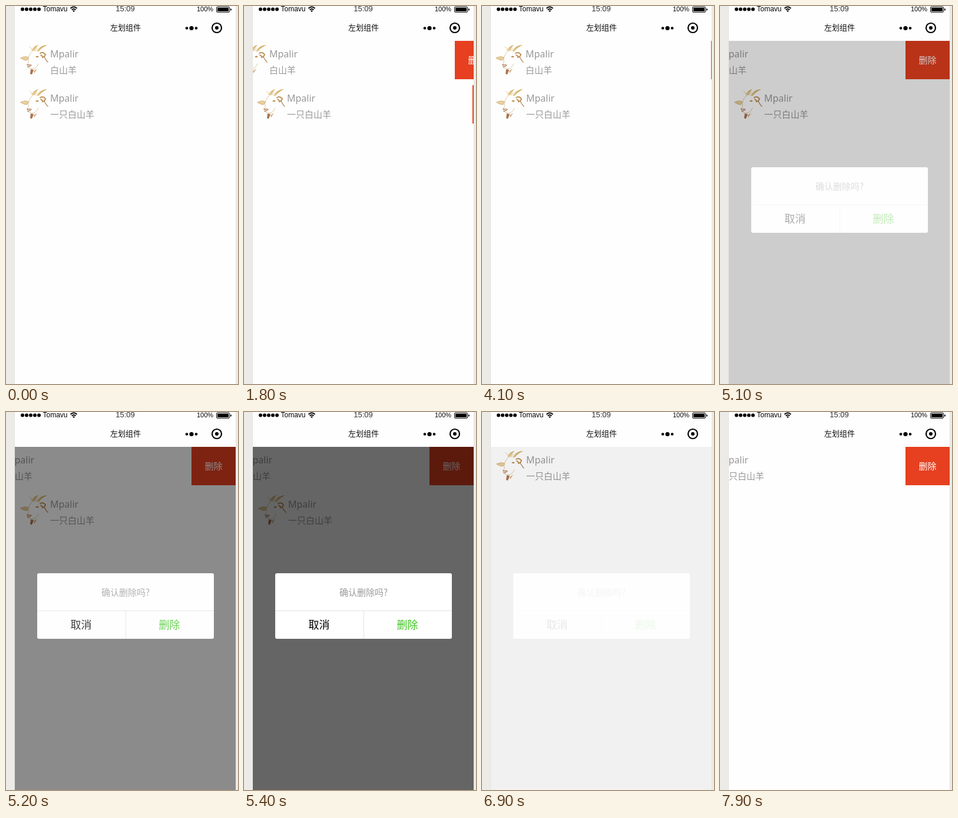
An HTML page for the animation above (8 s loop, 394 px wide and 640 px high).

```html
<!DOCTYPE html>
<html lang="zh-CN">
<head>
<meta charset="utf-8">
<style>
html, body { margin: 0; width: 100%; height: 100%; overflow: hidden; background: #ecebe7; }
svg { display: block; }
text { font-family: "Noto Sans CJK SC", "Noto Sans CJK", "Noto Sans", sans-serif; }
.bar text { font-family: "Liberation Sans", Arial, sans-serif; }
.name { font: 16px "Noto Sans", "Open Sans", sans-serif; fill: #999; }
.note { font-size: 15px; fill: #999; }
.mid { text-anchor: middle; }
</style>
</head>
<body>
<svg width="394" height="640" viewBox="0 0 394 640">
  <defs>
    <clipPath id="page"><rect x="15" y="59" width="375" height="581"/></clipPath>
    <linearGradient id="horn" x1="0" y1="1" x2="1" y2="0">
      <stop stop-color="#ecd5a4"/><stop offset="1" stop-color="#cda24f"/>
    </linearGradient>
    <g id="goat" fill="none" stroke="#cfa869" stroke-linecap="round">
      <path d="M13 22Q16 13 20 11M13 25Q14 30 11 33Q10 37 14 39Q18 41 23 40Q28 37 30 32" stroke="#dfc79c"/>
      <path d="M18 10C20 5 24 1 30 0C26 4 25 7 24 10ZM27 11C30 5 36 0 45 0C38 3 34 7 31 11Z" fill="url(#horn)" stroke="none"/>
      <path d="M20 10Q19 5 15 3M25 10L28 5" stroke="#e4cf9f"/>
      <path d="M0 22Q7 18 13 21Q14 25 9 26Q3 25 0 22Z" fill="#e8cf9f" stroke-width=".8"/>
      <path d="M33 14Q38 11 42 16Q41 20 37 21Q37 18 34 17" stroke="#b98a4a" stroke-width="1.800"/>
      <path d="M40 20Q42 25 46 29" stroke="#b88b62" stroke-width="1.300"/>
      <path d="M25 20Q28 17 31 20Q28 22 25 20Z" fill="#b98743" stroke="none"/>
      <path d="M11 33Q13 35 16 33M12 37Q15 37 18 34" stroke="#a9734f" stroke-width="1.300"/>
      <path d="M17 41L16 49L19 50L22 42Z" fill="#a9734f" stroke="none"/>
      <path d="M22 44L23 48L28 40Z" fill="#d3b08c" stroke="none"/>
    </g>
  </defs>

  <rect width="394" height="640" fill="#ecebe7"/>
  <rect x="14" width="377" height="640" fill="#e4e3de"/>
  <rect x="15" width="375" height="640" fill="#fefefe"/>

  <g class="bar">
    <g id="signal"></g>
    <text x="62.500" y="9" font-size="12">Tomavu</text>
    <g fill="none" stroke="#000" stroke-width="2">
      <path d="M109.500 4Q115 -1 120.500 4M111.700 6.500Q115 3.500 118.300 6.500"/>
    </g>
    <path d="M113 8Q115 6.500 117 8L115 10.200Z"/>
    <text class="mid" x="202.500" y="9" font-size="13" fill="#333">15:09</text>
    <text x="324" y="9" font-size="11">100%</text>
    <rect x="357.500" y="1.500" width="22" height="9" rx="1.500" fill="none" stroke="#000"/>
    <rect x="359" y="3" width="19" height="6"/>
    <path d="M381 4Q383 4.500 383 6T381 8Z"/>
  </g>
  <text class="mid" x="203" y="40.500" font-size="13" fill="#111">左划组件</text>
  <circle cx="307" cy="37.500" r="2.300"/>
  <circle cx="315" cy="37.500" r="3.600"/>
  <circle cx="323" cy="37.500" r="2.300"/>
  <circle cx="358" cy="37" r="8" fill="none" stroke="#000" stroke-width="2.200"/>
  <circle cx="358" cy="37" r="3"/>

  <g clip-path="url(#page)">
    <g id="list"></g>
    <g id="modal">
      <rect x="15" y="59" width="375" height="581" fill="#000" opacity=".6"/>
      <rect x="53" y="273" width="300" height="111" rx="3" fill="#fff"/>
      <path id="press" d="M203 336H353V381Q353 384 350 384H203Z" fill="#eee"/>
      <path d="M53 336.500H353M203.500 336V384" stroke="#e2e2e3"/>
      <g class="mid">
        <text x="203" y="311" font-size="15" fill="#999">确认删除吗?</text>
        <text x="127.500" y="366.500" font-size="18">取消</text>
        <text x="277.500" y="366.500" font-size="18" fill="#3cc51f">删除</text>
      </g>
    </g>
  </g>
</svg>
<script>
const LOOP = 8000, TICK = 100, OPEN = 75;
const $ = id => document.getElementById(id);

$('signal').innerHTML = [0, 1, 2, 3, 4]
  .map(i => `<circle cx="${28 + 7 * i}" cy="5.5" r="3"/>`).join('');

$('list').innerHTML = ['白山羊', '一只白山羊'].map(note => `<g>
  <use href="#goat" x="25" y="7"/>
  <text class="name" x="75" y="28">Mpalir</text>
  <text class="note" x="75" y="54.5">${note}</text>
  <rect x="390" width="75" height="65" fill="#e64020"/>
  <text class="mid" x="427.5" y="38" font-size="15" fill="#fff">删除</text>
</g>`).join('');
const rows = [...$('list').children];

// Moves per row: [start, value reached, head start in ms]
const slides = [
  [[800, 1, 80], [1800, 0, 165], [2700, 1, 30], [3500, 0, 165], [4100, 1, 22]],
  [[1800, 1, 30], [2700, 0, 180], [7600, 1, 80]]
];
const fade = [[5100, 1, 110], [6800, 0, 180]];

const ease = x => x > 375 ? 1 : 1 - Math.exp(-((x / 178) ** 2));

function valueAt(moves, t) {
  let v = 0;
  for (const [start, to, lead] of moves)
    if (t >= start) v += (to - v) * ease(t - start + lead);
  return v;
}

function draw(time) {
  const t = Math.floor(time % LOOP / TICK) * TICK;
  const removed = t >= 6800;
  rows.forEach((row, i) => {
    const x = -Math.round(OPEN * valueAt(slides[i], t));
    const y = 59 + (removed ? 0 : 75 * i);
    row.setAttribute('transform', `translate(${x} ${y})`);
  });
  rows[0].style.display = removed ? 'none' : '';
  $('modal').style.opacity = valueAt(fade, t);
  $('press').style.opacity = +(t === 6700);
}

const begin = performance.now();
function loop() {
  draw(performance.now() - begin);
  requestAnimationFrame(loop);
}
loop();
</script>
</body>
</html>
```
